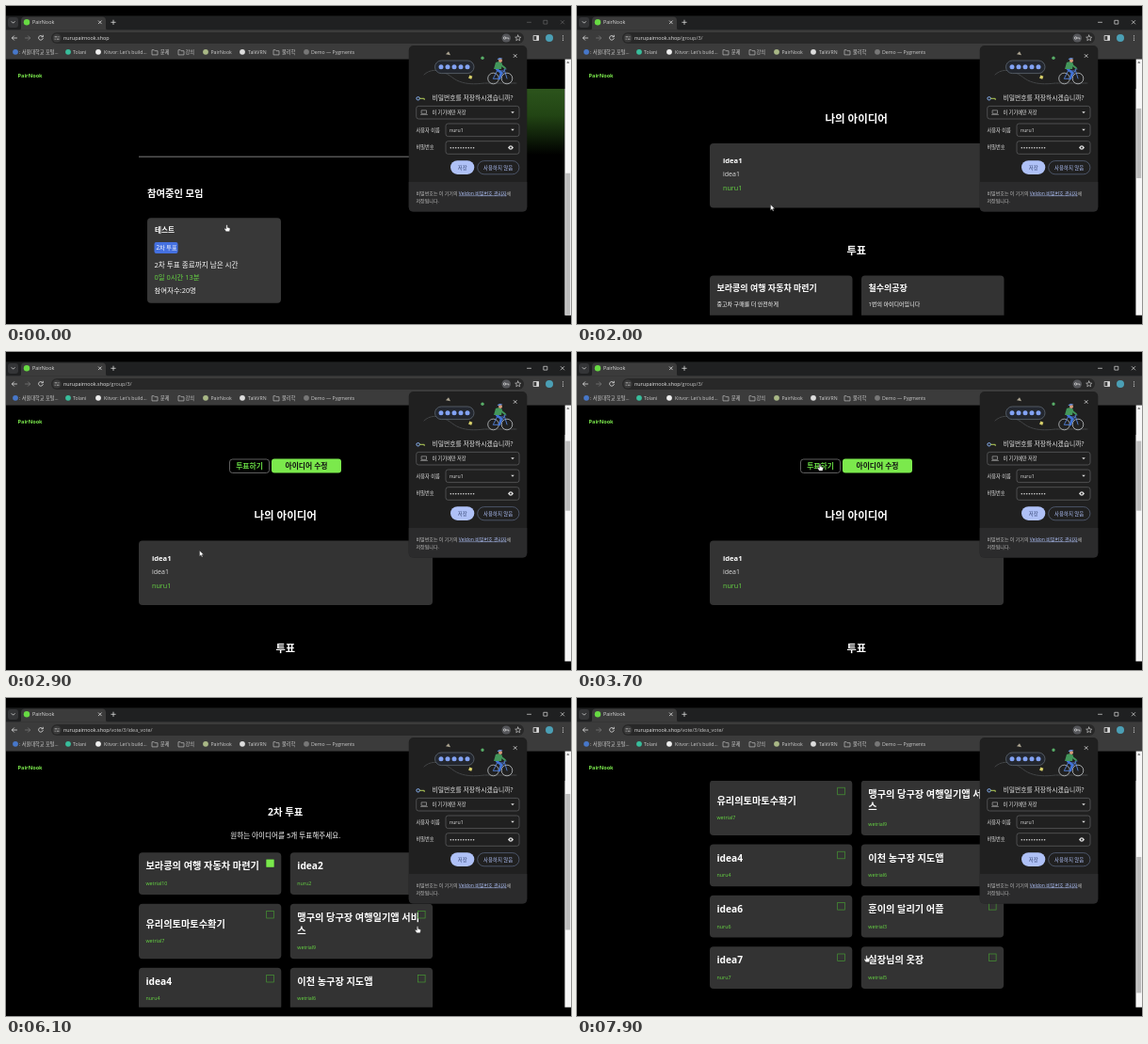
Write an HTML page that moves like this. It is 600 by 338 pixels and loops after 8 s.

```html
<!DOCTYPE html>
<html lang="ko">
<head>
<meta charset="utf-8">
<style>
html, body { margin: 0; width: 100%; height: 100%; overflow: hidden; background: #000; }
svg { display: block; width: 100vw; height: 100vh; }
text { font-family: 'Open Sans', 'Noto Sans CJK KR', 'Noto Sans CJK', sans-serif; white-space: pre; }
</style>
</head>
<body>
<svg id="stage" viewBox="0 0 600 338"></svg>
<script>
const LOOP = 8000;
const BRAND = 'PairNook', DOMAIN = 'nurupairnook.shop';
const GREEN = '#67d943', LIME = '#7be94c', CARD = '#333';

// ---- drawing helpers; text is placed by its vertical centre ----
const text = (x, cy, size, str, fill = '#fff', extra = '') =>
  `<text x="${x}" y="${cy + size * 0.36}" font-size="${size}" fill="${fill}" ${extra}>${str}</text>`;
const bold = (x, cy, size, str, fill = '#fff', extra = '') =>
  text(x, cy, size, str, fill, `font-weight="700" ${extra}`);
const title = (cy, size, str, fill) => bold(296.7, cy, size, str, fill, 'text-anchor="middle"');
const rect = (x, y, w, h, fill, r = 0, extra = '') =>
  `<rect x="${x}" y="${y}" width="${w}" height="${h}" rx="${r}" fill="${fill}" ${extra}/>`;
const dot = (x, y, r, fill, extra = '') => `<circle cx="${x}" cy="${y}" r="${r}" fill="${fill}" ${extra}/>`;
const line = (d, stroke = '#ddd', w = 0.8, extra = '') =>
  `<path d="${d}" fill="none" stroke="${stroke}" stroke-width="${w}" stroke-linecap="round" stroke-linejoin="round" ${extra}/>`;
const shape = (d, fill, extra = '') => `<path d="${d}" fill="${fill}" ${extra}/>`;

// ---- pages, in stage coordinates at zero scroll ----
function homePage() {
  return rect(428, 88, 165, 70, 'url(#glow)') +
    rect(141, 159.5, 312, 1.5, '#555') +
    bold(150, 199.3, 10.3, '참여중인 모임') +
    rect(150, 225.3, 142, 90.5, '#383838', 4) +
    bold(158, 238.4, 7.6, '테스트') +
    rect(157.5, 251, 25, 12, '#4470e0', 2) +
    text(159.5, 257, 6.2, '2차 투표') +
    text(157.5, 275, 7.6, '2차 투표 종료까지 남은 시간') +
    text(157.5, 288.7, 7.4, '0일 0시간 13분', GREEN) +
    text(157.5, 302.3, 7.4, '참여자수:20명');
}

function groupPage() {
  const idea = (x, name, note, author) => rect(x, 465.5, 151.5, 75, CARD, 4) +
    bold(x + 7.5, 479, 9, name) + text(x + 7.5, 496, 6, note) + text(x + 7.5, 512.5, 6.8, author);
  return title(136, 13.4, '테스트', GREEN) +
    title(157, 7.6, '2차 투표 진행중') +
    rect(237.5, 238.5, 42, 14.5, '#000', 3, 'stroke="#777" stroke-width=".8"') +
    bold(258.5, 245.5, 7.8, '투표하기', GREEN, 'text-anchor="middle"') +
    rect(282, 238, 74, 15, LIME, 3) +
    bold(319, 245.5, 7.8, '아이디어 수정', '#111', 'text-anchor="middle"') +
    title(298.5, 11.5, '나의 아이디어') +
    rect(141, 325, 312, 68.5, CARD, 4) +
    bold(155, 343.5, 7.6, 'idea1') +
    text(155, 358, 7, 'idea1', '#ddd') +
    text(155, 373, 7.2, 'nuru1', GREEN) +
    title(439, 11.2, '투표') +
    idea(141, '보라콩의 여행 자동차 마련기', '중고차 구매를 더 안전하게', 'wetrial10') +
    idea(302, '철수의공장', '1번의 아이디어입니다', 'wetrial1');
}

function votePage() {
  const rows = [
    [242.6, 44.8, '보라콩의 여행 자동차 마련기', 'wetrial10', 'idea2', 'nuru2'],
    [297, 58.5, '유리의토마토수확기', 'wetrial7', '맹구의 당구장 여행일기앱 서비|스', 'wetrial9'],
    [365, 44.8, 'idea4', 'nuru4', '이천 농구장 지도앱', 'wetrial6'],
    [419.3, 44.8, 'idea6', 'nuru6', '훈이의 달리기 어플', 'wetrial3'],
    [473.8, 44.8, 'idea7', 'nuru7', '실장님의 옷장', 'wetrial5']
  ];
  const option = (x, y, h, name, author) => {
    const lines = name.split('|');
    const top = y + (h > 50 && lines.length < 2 ? 21.5 : 14.5);
    return rect(x, y, 151.3, h, CARD, 4) +
      lines.map((s, i) => bold(x + 7.5, top + i * 13.7, 10.2, s)).join('') +
      text(x + 7.5, top + lines.length * 13.7 + 4.7, 5.3, author, GREEN) +
      rect(x + 135.7, y + 7.7, 7.6, 7.6, 'none', 0, 'stroke="#47a032" stroke-width=".65"');
  };
  return title(136, 13.4, '테스트', GREEN) +
    title(156, 10.3, '아이디어 투표') +
    title(200, 10.4, '2차 투표') +
    text(296.7, 224.5, 7.6, '원하는 아이디어를 5개 투표해주세요.', '#fff', 'text-anchor="middle"') +
    rows.map(([y, h, a, by, b, by2]) => option(141, y, h, a, by) + option(301.8, y, h, b, by2)).join('') +
    rect(276.5, 250, 8, 8, LIME, 0, 'id="tick"');
}

// ---- browser window ----
function browser() {
  const folder = x => shape(`M${x} 46.7h2.2l.8 1h3v4.2h-6z`, 'none', 'stroke="#bbb" stroke-width=".7"');
  const label = (x, str) => text(x, 48.8, 5.2, str, '#ccc');
  const mark = (x, str, fill, tx = x + 5) => dot(x, 48.8, 2.9, fill) + label(tx, str);
  return rect(0, 10.4, 600, 15, '#1f2021') +
    rect(2, 12, 11, 11, '#343537', 3) + line('M6 16.6l1.6 1.6 1.6-1.6') +
    shape('M14 25.4q2 0 2-2v-8q0-4 4-4h82q4 0 4 4v8q0 2 2 2z', '#3b3b3b') +
    dot(22, 17.3, 3.2, GREEN) + text(28, 17.3, 5.4, BRAND, '#ddd') +
    line('M98.3 15.8l3 3m0-3l-3 3') + line('M111.8 17.3h4.4m-2.2-2.2v4.4') +
    `<g id="controls">${line('M553.5 17.3h4M571.2 15.3h3.6v3.8h-3.6zM589.2 15.5l3.5 3.5m0-3.5l-3.5 3.5', '#ddd', 0.7)}</g>` +
    rect(0, 25.2, 600, 31.4, '#3b3b3b') +
    line('M11.5 34h-5m2-2.2L6.3 34l2.2 2.2') +
    line('M20.5 34h5m-2-2.2l2.2 2.2-2.2 2.2', '#777') +
    line('M39 32.5a2.4 2.4 0 1 0 .3 2M39.3 31.2v1.6h-1.6') +
    rect(48, 28, 502, 12, '#282828', 6) + dot(54, 34, 4.5, '#3b3b3b') +
    line('M52 32.8h2m1.8 0h.3M52 35.2h.3m1.8 0h2', '#ddd', 0.7) +
    `<text x="61" y="36" font-size="5.4" fill="#e8e8e8">${DOMAIN}<tspan id="path" fill="#c4c4c4"></tspan></text>` +
    rect(526.5, 29.5, 9.5, 9, '#55565a', 4.5) +
    dot(529.6, 34, 1.2, 'none', 'stroke="#ddd" stroke-width=".7"') + line('M531 34h2.8v1', '#ddd', 0.7) +
    line('M543.7 31l.9 2 2.1.2-1.6 1.4.5 2.1-1.9-1.1-1.9 1.1.5-2.1-1.6-1.4 2.1-.2z', '#ddd', 0.6) +
    line('M560.5 31.5h5v5h-5z') + rect(563.3, 31.5, 2.5, 5, '#ddd') +
    dot(577, 34, 4, '#4b9fb5') + [31.8, 34, 36.2].map(y => dot(591.5, y, 0.6, '#ddd')).join('') +
    mark(10, ': 서울대학교 포털…', '#4777c9', 14) +
    mark(66, 'Tolani', '#38bd9b', 71) +
    mark(98, "Kitvor: Let's build...", '#eee', 104) +
    folder(155) + label(164, '문제') +
    folder(183) + label(190.5, '강의') +
    mark(212, BRAND, '#a9b886', 217.5) + mark(251, 'TalkVRN', '#ddd', 257) +
    folder(284) + label(293, '물리학') +
    mark(319, 'Demo — Pygments', '#777', 324);
}

function popup() {
  const field = (x, y, w) => rect(x, y, w, 13.6, '#202020', 2.5, 'stroke="#6c6d6f" stroke-width=".6"');
  const caret = (x, y) => shape(`M${x - 1.8} ${y - 0.9}h3.6l-1.8 2z`, '#ddd');
  return rect(427.7, 42, 125.6, 176.6, '#202020', 5) +
    shape('M427.7 187h125.6v26.6q0 5-5 5h-115.6q-5 0-5-5z', '#2b2b2c') +
    line('M539.2 51.5l3 3m0-3l-3 3') +
    line('M444 73c10-9 22-3 30 3s18 8 34 6h34', '#5d6164', 0.6, 'stroke-dasharray="2 1"') +
    rect(455.5, 58, 41.5, 13.6, '#23272f', 6.8, 'stroke="#66707c" stroke-width=".7"') +
    [462, 469, 476, 483, 490].map(x => dot(x, 64.8, 2.5, '#82a2f4')).join('') +
    shape('M467 51.3l3-3 2 4z', '#aaa28f') + dot(506, 55.3, 1.7, '#58ad68') +
    rect(491.5, 74, 3.3, 3.3, '#d8d06a', 0, 'transform="rotate(20 493 76)"') +
    cyclist() +
    dot(437.6, 98.3, 1.7, 'none', 'stroke="#8ab4f8" stroke-width="1"') +
    line('M439.6 98.3h4.6v1.2', '#b4cf59', 1) +
    text(452.5, 98, 6.8, '비밀번호를 저장하시겠습니까?', '#e4e4e4') +
    field(435.7, 106.4, 109.3) + line('M441.5 110.9h5v3.4h-5zM440.5 115.4h7', '#bbb', 0.6) +
    text(452.5, 113.2, 5.2, '이 기기에만 저장', '#e4e4e4') + caret(538, 113.2) +
    text(435.5, 131.7, 5.2, '사용자 이름', '#e4e4e4') + field(467, 125, 78) +
    text(471, 131.7, 5.2, 'nuru1', '#e4e4e4') + caret(538, 131.7) +
    text(435.5, 150.5, 5.2, '비밀번호', '#e4e4e4') + field(467, 143.7, 78) +
    Array.from({ length: 10 }, (_, i) => dot(472.3 + i * 2.7, 150.7, 0.8, '#ddd')).join('') +
    shape('M533 150.5q3-4.4 6 0q-3 4.4-6 0z', '#ddd') + dot(536, 150.5, 0.9, '#202020') +
    rect(472, 164.2, 25.3, 14.8, '#afc1f7', 7.4) +
    text(484.7, 171.7, 5.4, '저장', '#3a4a78', 'text-anchor="middle"') +
    rect(500.7, 164.6, 44.2, 14.2, 'none', 7.1, 'stroke="#5d6a86" stroke-width=".7"') +
    text(522.7, 171.7, 5.4, '사용하지 않음', '#afc1f7', 'text-anchor="middle"') +
    text(435.5, 198.8, 5, '비밀번호는 이 기기의 <tspan fill="#afc1f7" text-decoration="underline">Veldon 비밀번호 관리자</tspan>에', '#bcbcbc') +
    text(435.5, 206.8, 5, '저장됩니다.', '#bcbcbc');
}

function cyclist() {
  const wheel = x => dot(x, 77, 5.8, 'none', 'stroke="#d5d8db" stroke-width=".7"');
  return wheel(517.5) + wheel(532) +
    line('M517.5 77l4-8h7.5l-5 8zM532 77l-3-10h2', '#5b8ef0', 0.8) +
    line('M521 67l5 4-2 6', '#4274d8', 2.4) +
    shape('M518 67l2-7q4-2 7 1l-1 6z', '#43975b') +
    line('M525 62l5 4', '#43975b', 1.8) + dot(525, 58, 2, '#d69a7a') +
    shape('M521.5 57.3q2-4 6-1.3z', '#6991de');
}

const stage = document.getElementById('stage');
const layer = (id, body) => `<g id="${id}">${body}</g>`;
stage.innerHTML =
  `<defs><linearGradient id="glow" x2="0" y2="1"><stop stop-color="#2c541c"/><stop offset=".4" stop-color="#224514"/><stop offset="1" stop-color="#000"/></linearGradient>
   <clipPath id="view">${rect(0, 56, 600, 272.7, '#fff')}</clipPath></defs>` +
  rect(0, 0, 600, 338, '#000') +
  `<g clip-path="url(#view)">${layer('home', homePage())}${layer('group', groupPage())}${layer('vote', votePage())}
   ${rect(593.4, 56, 6.6, 273, '#f7f7f7')}${rect(594.2, 62, 5, 80, '#bdbdbd', 0, 'id="thumb"')}</g>` +
  rect(0, 56, 593.4, 32, '#000') + bold(12.5, 74.3, 5.6, BRAND, LIME) +
  shape('M595.2 60.7h3.2l-1.6-2z', '#666') +
  browser() + popup() +
  layer('arrow', shape('M0 0v6.2l1.5-1.4 1 2.3 1-.4-1-2.3h2z', '#fff', 'stroke="#222" stroke-width=".4"')) +
  layer('hand', shape('M-.7.4q.7-.9 1.4 0v2.4l2.2.7q.8.4.5 1.4l-.6 2.3h-3.6l-1.8-2.6q0-1 1.1-.7l.8.7z', '#fff', 'stroke="#222" stroke-width=".4"'));

const el = id => document.getElementById(id);

// ---- timing ----
const clamp = p => Math.max(0, Math.min(1, p));
const easeOut = p => 1 - (1 - p) ** 3;
const easeInOut = p => p * p * (3 - 2 * p);

// Each move is [start, duration, destination].
function track(t, from, moves, ease) {
  return moves.reduce((v, [start, span, to]) => v + (to - v) * ease(clamp((t - start) / span)), from);
}

// The browser viewport runs a little below the visible stage area.
const VIEW_HEIGHT = 283, TRACK_TOP = 62, TRACK_HEIGHT = 267;
const pages = [
  { id: 'home', start: 0, path: '', range: 220, scroll: () => 0, top: 218 },
  { id: 'group', start: 1350, path: '/group/3/', range: 737, top: 0,
    scroll: t => track(t, 0, [[1500, 785, 188], [2560, 280, 124.5]], easeOut) },
  { id: 'vote', start: 4000, path: '/vote/3/idea_vote/', range: 240, top: 0,
    scroll: t => track(t, 0, [[5950, 336, 94], [7300, 500, 209.5]], easeOut) }
];
const moveX = [[1400, 400, 205.5], [3050, 450, 258], [4150, 450, 301], [4800, 350, 280], [5450, 400, 437], [6600, 600, 307.5]];
const moveY = [[1400, 400, 211], [3050, 450, 119], [4150, 450, 214], [4800, 350, 253], [5450, 400, 242.5], [6600, 600, 273.5]];
const pointing = t => t < 1350 || (t > 3400 && t < 4000) || t > 5000;

function draw(t) {
  const page = pages.filter(p => t >= p.start).pop();
  const scroll = page.scroll(t);
  for (const p of pages) el(p.id).style.display = p === page ? '' : 'none';
  el(page.id).setAttribute('transform', `translate(0 ${-scroll})`);
  el('path').textContent = page.path;
  el('controls').style.opacity = t < 1000 ? 0.35 : 1;
  el('tick').style.display = t >= 5250 ? '' : 'none';

  const ratio = TRACK_HEIGHT / (VIEW_HEIGHT + page.range);
  el('thumb').setAttribute('y', TRACK_TOP + (scroll + page.top) * ratio);
  el('thumb').setAttribute('height', VIEW_HEIGHT * ratio);

  const x = track(t, 234.5, moveX, easeInOut), y = track(t, 232.5, moveY, easeInOut);
  const hand = pointing(t);
  el('hand').style.display = hand ? '' : 'none';
  el('arrow').style.display = hand ? 'none' : '';
  el(hand ? 'hand' : 'arrow').setAttribute('transform', `translate(${x} ${y})`);
}

const begin = performance.now();
function tick() {
  draw((performance.now() - begin) % LOOP);
  requestAnimationFrame(tick);
}
tick();
</script>
</body>
</html>
```
